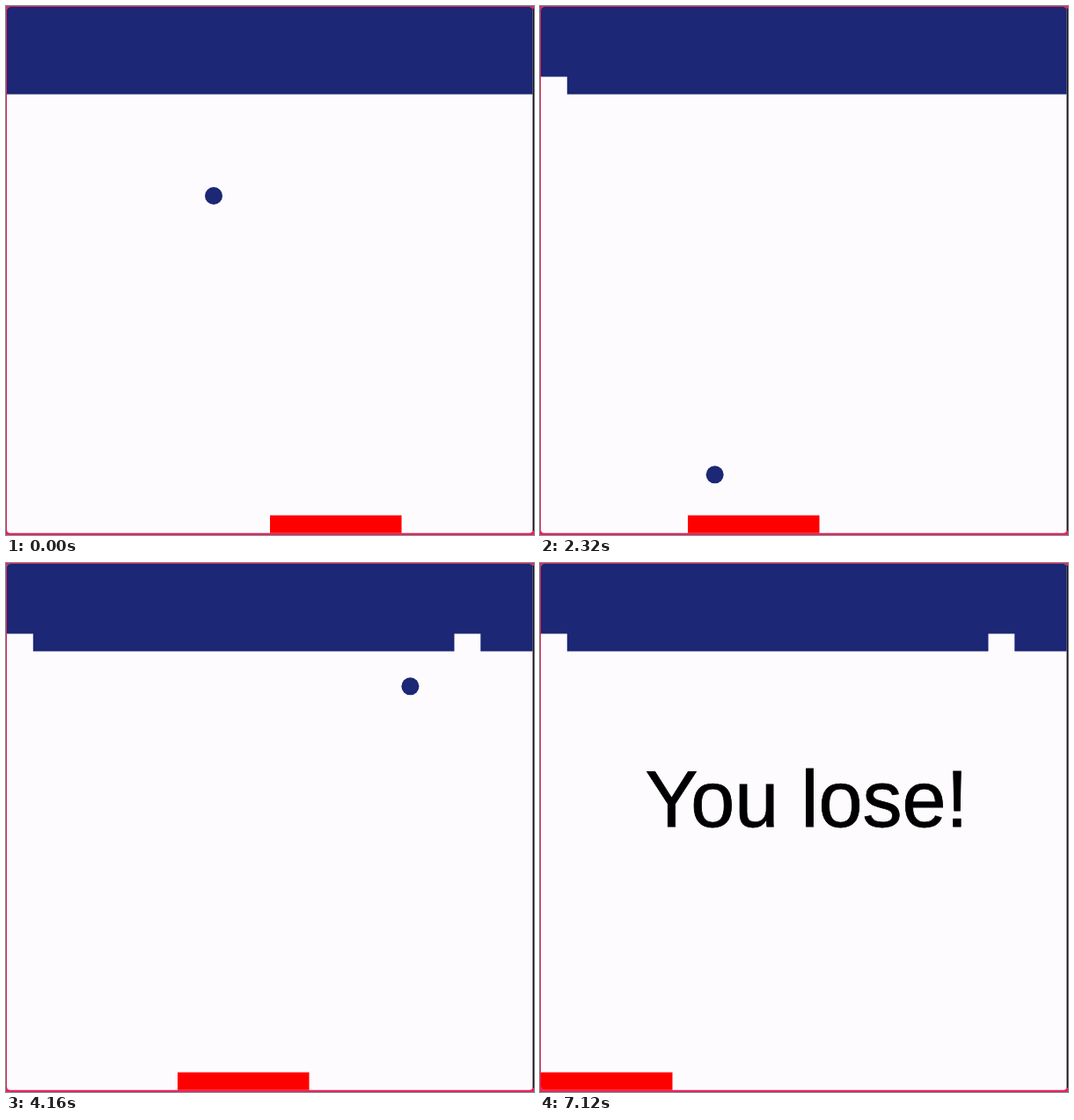
An HTML page with a canvas that plays this animation: 600x602 px, repeating every 7.16 s.

```html
<!DOCTYPE html>
<html lang="en">
<head>
<meta charset="utf-8">
<title>Brick game</title>
<style>
  html, body { margin: 0; width: 100%; height: 100%; overflow: hidden; background: #e0265f; }
  canvas { display: block; }
</style>
</head>
<body>
<canvas id="game" width="600" height="602"></canvas>
<script>
const ctx = document.getElementById('game').getContext('2d');
const LOOP = 7160, STEP = 40;
const BLUE = '#1c2775', PAPER = '#fdfbfe', RED = '#ff0000', PINK = '#e0265f';

const START = { x: 236, y: 216 };
const LEFT = 8, RIGHT = 592, TOP = 110, FLOOR = 570, RADIUS = 10;
const BRICK = { w: 30, h: 20, bottom: 100.5 };

// Sideways distance the ball has covered; it falls half as far
const pace = [[0, 0], [920, 510], [3320, 1702], [5200, 2621], [6100, 3075]];
// Left edge of the paddle where the player steers it
const steering = [[0, 300], [920, 220], [2320, 168], [3320, 360],
                  [4160, 195], [4600, 1], [5200, 173], [6000, 1]];

// Distances at which the ball meets the bricks, and the one where it is missed
const firstHit = 2 * (START.y - TOP);
const secondHit = firstHit + 4 * (FLOOR - TOP);
const missed = secondHit + 2 * (FLOOR - TOP);

const linear = k => k;
const smooth = k => k * k * (3 - 2 * k);

function between(keys, t, ease) {
  const i = keys.findIndex(k => k[0] > t);
  if (i < 0) return keys[keys.length - 1][1];
  const [t0, a] = keys[i - 1], [t1, b] = keys[i];
  return a + (b - a) * ease((t - t0) / (t1 - t0));
}

// Reflects an endless straight line between two walls
function bounce(v, min, max) {
  const span = max - min;
  const d = Math.abs(v - min) % (2 * span);
  return min + (d > span ? 2 * span - d : d);
}

function ballAt(dist) {
  return {
    x: bounce(START.x - dist, LEFT, RIGHT),
    y: dist < missed ? bounce(START.y - dist / 2, TOP, FLOOR)
                     : FLOOR + (dist - missed) / 2
  };
}

function rect(color, x, y, w, h) {
  ctx.fillStyle = color;
  ctx.fillRect(x, y, w, h);
}

function drawBricks(dist) {
  rect(BLUE, 0, 0, 600, BRICK.bottom);
  for (const hit of [firstHit, secondHit]) {
    if (dist < hit) continue;
    const col = Math.floor(ballAt(hit).x / BRICK.w);
    const x = 1 + col * BRICK.w * 0.997;
    rect(PAPER, x, BRICK.bottom - BRICK.h, BRICK.w - 0.2, BRICK.h + 1);
  }
}

function drawBall({ x, y }) {
  ctx.fillStyle = BLUE;
  ctx.beginPath();
  ctx.arc(x, y, RADIUS, 0, Math.PI * 2);
  ctx.fill();
}

function drawMessage() {
  ctx.fillStyle = ctx.strokeStyle = '#000';
  ctx.lineWidth = 0.8;
  ctx.font = '90px "Liberation Sans", Arial, sans-serif';
  ctx.fillText('You lose!', 119.5, 300);
  ctx.strokeText('You lose!', 119.5, 300);
}

function draw(t) {
  const dist = between(pace, t, linear);
  const ball = ballAt(dist);

  rect(PINK, 0, 0, 600, 602);
  rect('#15101c', 598, 3, 2, 594);

  ctx.save();
  ctx.beginPath();
  ctx.roundRect(1, 1, 597.5, 598.7, 4);
  ctx.clip();
  rect(PAPER, 0, 0, 600, 602);
  drawBricks(dist);
  rect(RED, between(steering, t, smooth), 579.6, 149.5, 21);
  if (ball.y < 600 + RADIUS) drawBall(ball);
  else drawMessage();
  ctx.restore();
}

const start = performance.now();
function tick() {
  const t = (performance.now() - start) % LOOP;
  draw(Math.floor(t / STEP) * STEP);
  requestAnimationFrame(tick);
}
tick();
</script>
</body>
</html>
```
